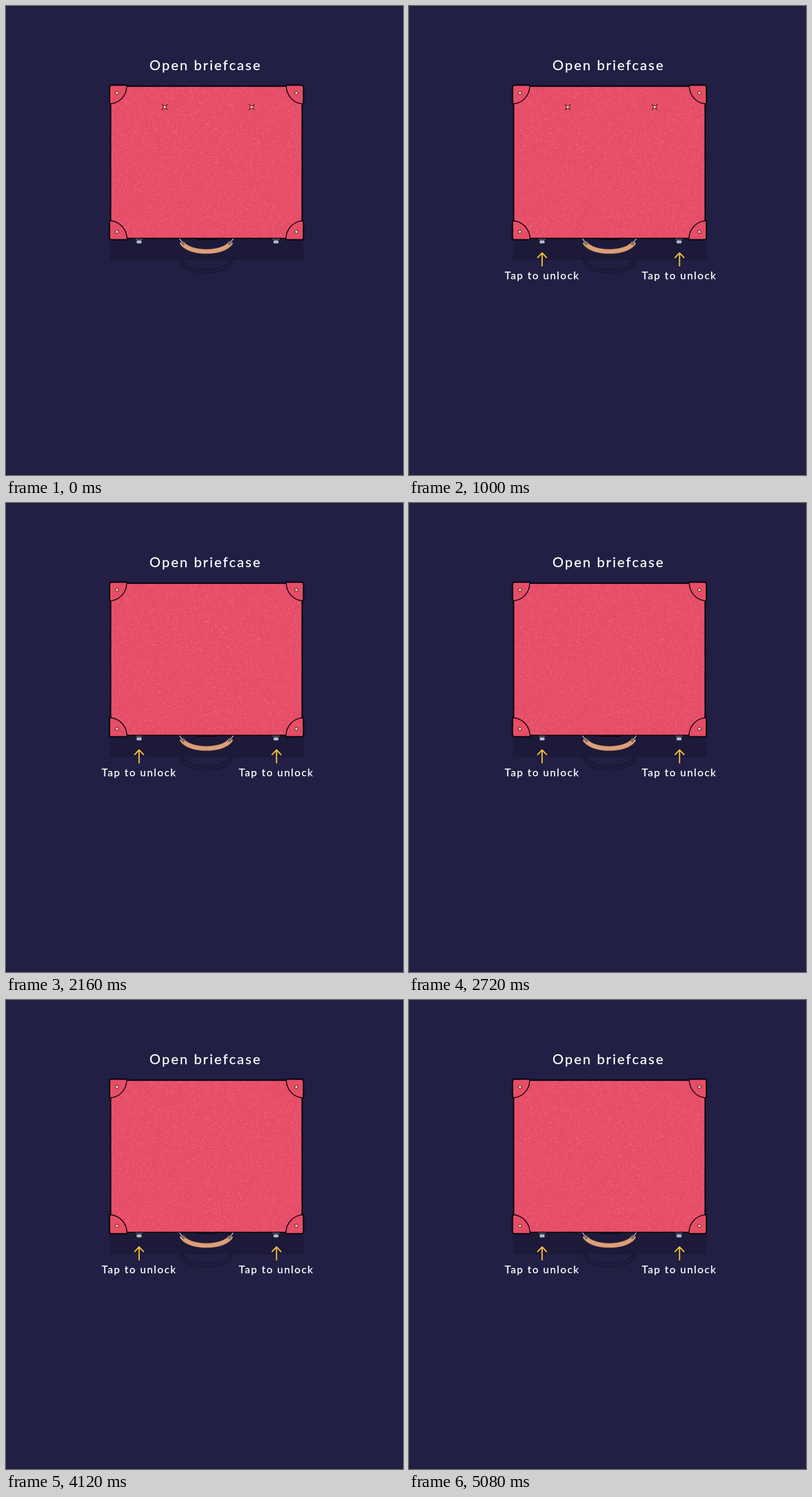
Recreate the animation shown at these times as an HTML page. Size 689 by 812 pixels, loop 5.12 s.

```html
<!DOCTYPE html>
<html lang="en">
<head>
<meta charset="utf-8">
<title>Open briefcase</title>
<style>
  html, body { margin: 0; width: 100%; height: 100%; overflow: hidden; background: #211f43; }
  svg { display: block; width: 689px; height: 812px; }
  text { font-family: Lato, sans-serif; fill: #fff; stroke: #fff; stroke-width: .3; }
  .title { font-size: 24px; letter-spacing: 2.5px; }
  .label { font-size: 18px; letter-spacing: 1.9px; }
  .arrow { fill: none; stroke: #f3c238; stroke-width: 2.2; stroke-linecap: round; stroke-linejoin: round; }
  .ink { stroke: #0d0714; }
</style>
</head>
<body>
<svg viewBox="0 0 689 812">
  <defs>
    <path id="corner" d="M0 4Q0 0 4 0H30V1.5A30 31 0 0 1 0 32.5Z" fill="#e64d66" class="ink" stroke-width="1.6"/>
    <path id="edge" d="M30 .2H4Q.2 .2 .2 4V32" fill="none" class="ink" stroke-width="2.4"/>
    <circle id="stud" r="2.8" fill="#f3d49b" stroke="#4b1e26" stroke-width="1.1"/>
    <g id="fastener">
      <path d="M-5-5L5 5M5-5L-5 5" stroke="#4b1e26" stroke-width="1.1"/>
      <use href="#stud"/>
    </g>
    <g id="latch">
      <path d="M-8 403.5H8" class="ink" stroke-width="3"/>
      <path d="M-6.5 403.8H6.5" stroke="#8d98a8" stroke-width="1"/>
      <rect x="-4.8" y="405.2" width="9.6" height="6.2" rx="2.5" fill="#afbaca" class="ink" stroke-width=".7"/>
    </g>
    <path id="handle" d="M306 411C314 421 331 425 347.7 425S381.4 421 389.4 411" fill="none" stroke-linecap="round"/>
    <path id="arrow" class="arrow" d="M0 450V428M-7.6 435.6L0 427.6L7.6 435.6"/>
    <path id="loop" d="M301.5 403.5L308 412M394 403.5L387.5 412" fill="none" stroke-linecap="round"/>
    <clipPath id="inside"><rect x="183" y="140.2" width="329.7" height="261"/></clipPath>
  </defs>

  <rect width="689" height="812" fill="#211f43"/>
  <text class="title" x="249" y="111">Open briefcase</text>

  <g id="reflection">
    <rect x="180.5" y="405" width="336" height="35" rx="2" fill="#1c1939"/>
    <g transform="translate(0 34)">
      <use href="#loop" stroke="#19162f" stroke-width="2"/>
      <use href="#handle" stroke="#19162f" stroke-width="8.6"/>
      <use href="#handle" stroke="#1e1b3c" stroke-width="6"/>
    </g>
  </g>

  <rect x="181.5" y="138.8" width="332.5" height="263.7" fill="#e64d66" class="ink" stroke-width="2.5"/>
  <g id="grain" clip-path="url(#inside)" fill="none"></g>
  <g id="corners"></g>
  <g id="fasteners">
    <use href="#fastener" x="275.5" y="175"/>
    <use href="#fastener" x="426.3" y="175"/>
  </g>

  <rect x="331" y="402" width="35" height="3" rx="1" fill="#0d0714"/>
  <use href="#latch" x="231"/>
  <use href="#latch" x="468.6"/>
  <use href="#handle" stroke="#6f4230" stroke-width="9"/>
  <use href="#handle" stroke="#d9a07a" stroke-width="7.2"/>
  <use href="#loop" class="ink" stroke-width="3.4"/>
  <use href="#loop" stroke="#a9b3c2" stroke-width="1.8"/>

  <g id="arrows">
    <use href="#arrow" x="231"/>
    <use href="#arrow" x="469.5"/>
  </g>
  <g id="labels">
    <text class="label" x="166" y="473">Tap to unlock</text>
    <text class="label" x="404" y="473">Tap to unlock</text>
  </g>
</svg>
<script>
  const LOOP = 5120;
  const byId = id => document.getElementById(id);

  // Mirrored corner guards: x, y, scale x, scale y, stud x, stud y
  const guards = [
    [179.6, 136.8, 1, 1, 192.6, 150.5],
    [516.4, 136.8, -1, 1, 504, 150.5],
    [179.4, 405, 1.02, -1.02, 192.6, 391],
    [516.4, 405, -1.02, -1.02, 504, 391]
  ];
  byId('corners').innerHTML = guards.map(([x, y, sx, sy, studX, studY]) =>
    `<g transform="translate(${x} ${y}) scale(${sx} ${sy})"><use href="#corner"/><use href="#edge"/></g>
     <use href="#stud" x="${studX}" y="${studY}"/>`).join('');

  // Fine leather speckle
  let seed = 7;
  const random = () => (seed = seed * 16807 % 2147483647) / 2147483647;
  const speckle = (count, size, color, opacity) => {
    let d = '';
    for (let i = 0; i < count; i++) {
      d += `M${(182 + random() * 332).toFixed(1)} ${(139 + random() * 263).toFixed(1)}h${size}`;
    }
    return `<path d="${d}" stroke="${color}" stroke-width="${size}" opacity="${opacity}"/>`;
  };
  byId('grain').innerHTML =
    speckle(6500, 1, '#f58c98', .4) +
    speckle(1500, 1, '#ffc0c2', .5) +
    speckle(2500, 1, '#d9405c', .4);

  // id, opacity before, opacity after, start ms, end ms
  const fades = [
    ['arrows', 0, 1, 200, 500],
    ['labels', 0, 1, 480, 840],
    ['fasteners', 1, 0, 1720, 1960]
  ];
  for (const [id, before, after, start, end] of fades) {
    byId(id).animate([
      { opacity: before, offset: 0 },
      { opacity: before, offset: start / LOOP },
      { opacity: after, offset: end / LOOP },
      { opacity: after, offset: 1 }
    ], { duration: LOOP, iterations: Infinity });
  }
</script>
</body>
</html>
```
